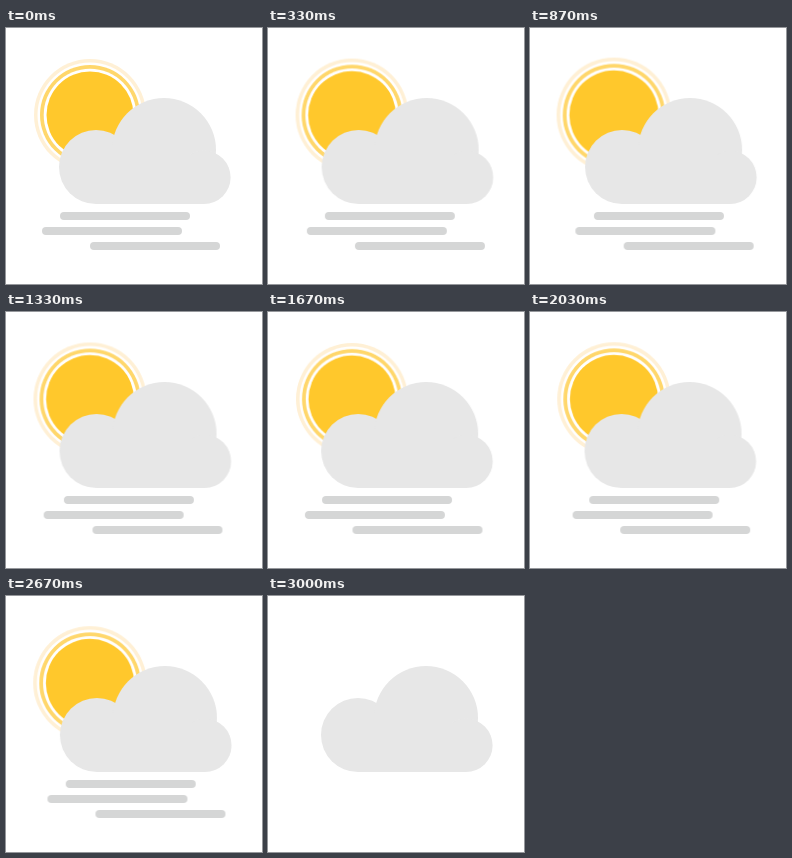
An HTML page for the animation above (3030 ms loop, 256 px wide and 256 px high).

```html
<!DOCTYPE html>
<html lang="en">
<head>
<meta charset="utf-8">
<title>Partly cloudy with wind</title>
<style>
  html, body { margin: 0; width: 100%; height: 100%; overflow: hidden; background: #fff; }
  svg { display: block; width: 100vw; height: 100vh; }

  .sun, .cloud, .wind path { animation: 3030ms cubic-bezier(.364, 0, .636, 1) infinite; }
  .sun { transform-origin: 84px 87px; animation-name: pulse; }
  .cloud { fill: #e7e7e7; animation-name: drift; }
  .wind { fill: none; stroke: #d5d6d6; stroke-width: 8; stroke-linecap: round; }
  .wind .a { animation-name: gust-a; }
  .wind .b { animation-name: gust-b; }
  .wind .c { animation-name: gust-c; }
  .blink { animation: blink 3030ms step-end infinite; }

  @keyframes pulse {
    0%, 53.8%, 99%, 100% { transform: scale(1); }
    29.7%, 79.2% { transform: scale(1.025); }
  }
  @keyframes drift {
    0%, 51.2%, 99%, 100% { transform: translateX(0); }
    29.7%, 75.2% { transform: translateX(2.1px); }
  }
  @keyframes gust-a {
    0%, 54.1%, 99%, 100% { transform: translateX(0); }
    30.4%, 79.2% { transform: translateX(10px); }
  }
  @keyframes gust-b {
    0%, 49.5%, 99%, 100% { transform: translateX(0); }
    29.4% { transform: translateX(9.4px); }
    78.5% { transform: translateX(10px); }
  }
  @keyframes gust-c {
    0%, 51.3%, 99%, 100% { transform: translateX(0); }
    29.4% { transform: translateX(9.7px); }
    78.5% { transform: translateX(10px); }
  }
  /* sun and wind drop out for the last moment of the loop */
  @keyframes blink {
    0% { visibility: visible; }
    99%, 100% { visibility: hidden; }
  }
</style>
</head>
<body>
<svg viewBox="0 0 256 256">
  <g class="blink">
    <g class="sun">
      <circle cx="84" cy="87" r="56" fill="#fff0d5"/>
      <circle cx="84" cy="87" r="52.5" fill="#fff"/>
      <circle cx="84" cy="87" r="50" fill="#ffd76b"/>
      <circle cx="84" cy="87" r="46.3" fill="#fff"/>
      <circle cx="84" cy="87" r="43.5" fill="#ffc82c"/>
    </g>
  </g>
  <g class="cloud">
    <circle cx="90" cy="139" r="37"/>
    <circle cx="158" cy="122" r="52"/>
    <circle cx="198" cy="149.4" r="26.6"/>
    <path d="M90 130H198V176H90Z"/>
  </g>
  <g class="wind blink">
    <path class="a" d="M58 188H180"/>
    <path class="b" d="M40 203H172"/>
    <path class="c" d="M88 218H210"/>
  </g>
</svg>
</body>
</html>
```
